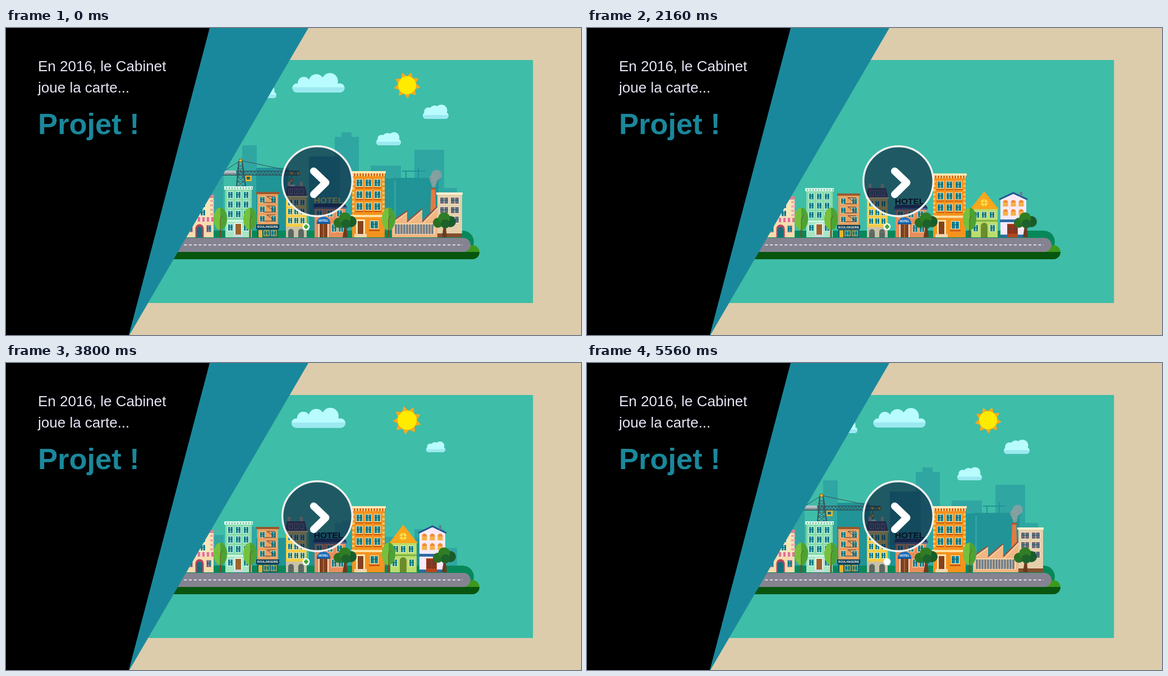
Write an HTML page with a canvas that moves like this. It is 1025 px wide and 547 px high and loops after 5600 ms.

```html
<!DOCTYPE html>
<html lang="fr">
<head>
<meta charset="utf-8">
<style>
  html, body { margin: 0; width: 100%; height: 100%; overflow: hidden; background: #dcccac; }
  canvas { display: block; }
</style>
</head>
<body>
<canvas id="stage" width="1025" height="547"></canvas>
<script>
const ctx = document.getElementById('stage').getContext('2d');
const SANS = '"Liberation Sans", Arial, sans-serif';
const STREET = 373, HALF = 2800, TAU = Math.PI * 2;

const mix = (a, b, p) => a + (b - a) * p;
const span = (u, from, to) => Math.min(1, Math.max(0, (u - from) / (to - from)));
const easeOut = p => 1 - (1 - p) ** 2;
const backOut = p => 1 + 2.4 * (p - 1) ** 3 + 1.4 * (p - 1) ** 2;

function rect(x, y, w, h, color) {
  ctx.fillStyle = color;
  ctx.fillRect(x, y, w, h);
}
function round(x, y, w, h, r, color) {
  ctx.fillStyle = color;
  ctx.beginPath();
  ctx.roundRect(x, y, w, h, r);
  ctx.fill();
}
function oval(x, y, rx, ry, color, from = 0, to = TAU) {
  ctx.fillStyle = color;
  ctx.beginPath();
  ctx.ellipse(x, y, rx, ry, 0, from, to);
  ctx.fill();
}
const dot = (x, y, r, color) => oval(x, y, r, r, color);
function trace(points) {
  ctx.beginPath();
  points.forEach(([x, y]) => ctx.lineTo(x, y));
}
function poly(color, ...points) {
  ctx.fillStyle = color;
  trace(points);
  ctx.fill();
}
function line(color, width, ...points) {
  ctx.strokeStyle = color;
  ctx.lineWidth = width;
  trace(points);
  ctx.stroke();
}
function text(str, x, y, font, color, align = 'left') {
  ctx.font = `${font} ${SANS}`;
  ctx.fillStyle = color;
  ctx.textAlign = align;
  ctx.fillText(str, x, y);
}
function clipped(x, y, w, h, draw) {
  ctx.save();
  ctx.beginPath();
  ctx.rect(x, y, w, h);
  ctx.clip();
  draw();
  ctx.restore();
}
function scaled(x, y, sx, sy, draw) {
  if (sx <= 0 || sy <= 0) return;
  ctx.save();
  ctx.translate(x, y);
  ctx.scale(sx, sy);
  ctx.translate(-x, -y);
  draw();
  ctx.restore();
}
const rise = (k, draw) => scaled(0, STREET, 1, k, draw);

function panes(xs, ys, w, h, frame, glass = '#14808e') {
  for (const y of ys) for (const x of xs) {
    rect(x - 1, y - 1, w + 2, h + 2, frame);
    rect(x, y, w, h, glass);
    rect(x + w / 2 - .5, y, 1, h, frame);
    rect(x, y + h * .4, w, 1, '#0c5f70');
  }
}
function arch(x, y, w, color) {
  oval(x, y, w / 2, w / 2, color, Math.PI, TAU);
  rect(x - w / 2, y, w, STREET - y, color);
}

// Sky
function cloud(x, base, w, h) {
  const puffs = color => {
    round(x - w / 2, base - h * .48, w, h * .48, h * .24, color);
    dot(x - w * .28, base - h * .5, h * .32, color);
    dot(x - w * .04, base - h * .56, h * .4, color);
    dot(x + w * .22, base - h * .6, h * .42, color);
  };
  puffs('#b8fcff');
  clipped(x - w, base - h * .27, w * 2, h * .27, () => puffs('#9be9f0'));
}
function sun(u) {
  const spikes = 9;
  const star = Array.from({ length: spikes * 2 }, (_, i) => {
    const a = i * Math.PI / spikes - TAU / 4 + (u - 1740) * .0003, r = i % 2 ? 16 : 24;
    return [715 + r * Math.cos(a), 102 + r * Math.sin(a)];
  });
  poly('#f6aa1c', ...star);
  dot(715, 102, 16, '#ffeb00');
}
function skyline() {
  const back = '#30a6a3', front = '#209497';
  const tower = (x, y, w, color) => rect(x, y, w, STREET - y, color);
  tower(350, 238, 38, back);
  tower(421, 209, 26, back);
  tower(586, 194, 43, back);
  rect(598, 186, 18, 8, back);
  tower(650, 245, 54, back);
  tower(728, 217, 53, back);
  tower(781, 285, 23, back);
  tower(446, 249, 58, front);
  tower(540, 229, 55, front);
  tower(676, 268, 16, front);
  tower(695, 271, 76, front);
  rect(691, 267, 84, 5, front);
  rect(706, 254, 42, 2, front);
  rect(712, 255, 2, 13, front);
  rect(734, 248, 2, 20, front);
}
function crane(u) {
  const steel = '#35505c';
  line(steel, 1, [387, 256], [418, 236], [523, 258]);
  line(steel, 2, [411, 283], [415, 238]);
  line(steel, 2, [427, 283], [421, 238]);
  for (let y = 242; y < 282; y += 8) line(steel, 1, [413, y], [424, y + 8], [412, y + 8], [423, y]);
  line(steel, 1.3, [385, 255], [523, 255]);
  line(steel, 1.3, [385, 262], [523, 262]);
  for (let x = 410; x < 520; x += 6) line(steel, 1, [x, 262], [x + 3, 255], [x + 6, 262]);
  rect(388, 254, 22, 7, '#b9c2c7');
  rect(388, 258, 22, 3, '#8c969d');
  rect(427, 263, 11, 10, '#e7b52b');
  rect(429, 265, 6, 5, '#28616c');
  const hook = 430 + 79 * easeOut(span(u, 1200, HALF));
  line(steel, 1, [hook, 259], [hook, 283]);
  rect(hook - 6, 279, 12, 4, '#e2e6e8');
  rect(hook - 7, 283, 14, 5, '#89939b');
  for (const [x, y] of [[418, 236], [521, 259], [hook, 259], [hook, 272]]) {
    dot(x, y, 3.3, '#594a25');
    dot(x, y, 2.5, '#efb51f');
  }
}

// Street fronts
function pinkHouse() {
  rect(335, 303, 35, 70, '#f8e5b9');
  rect(333, 297, 38, 6, '#d98390');
  for (let y = 306; y < 335; y += 8) rect(364, y, 7, 4, '#eeacaa');
  panes([347], [309, 324], 8, 10, '#fff3d4');
  rect(318, 344, 51, 29, '#f6dcae');
  rect(318, 337, 52, 8, '#e0718b');
  for (let x = 322; x < 368; x += 8) rect(x, 337, 4, 8, '#f8d5cf');
  arch(345, 357, 15, '#b4465b');
  arch(345, 359, 10, '#146f7c');
  panes([325, 358], [352], 7, 11, '#e38c97');
}
function greenHouse() {
  rect(391, 286, 47, 87, '#86dcaa');
  rect(389, 282, 51, 6, '#d6f8ea');
  for (let x = 392; x < 438; x += 5) rect(x, 284, 2, 3, '#78bfa0');
  rect(391, 342, 47, 3, '#d6f8ea');
  rect(391, 345, 47, 28, '#a8e6c3');
  panes([396, 410, 424], [292, 309, 326], 8, 11, '#d8f8ea');
  panes([396, 424], [350], 8, 11, '#e5fbf1');
  rect(407, 347, 14, 26, '#e9f5ec');
  rect(409, 349, 10, 24, '#a0622d');
  rect(405, 368, 18, 5, '#c9d8dc');
}
function bakery() {
  rect(448, 294, 37, 79, '#eaa061');
  rect(446, 292, 41, 4, '#96582f');
  panes([453, 473], [301, 318, 335], 8, 10, '#f8d09a');
  for (const y of [311, 328, 344]) line('#573b34', 1, [459, y], [481, y], [465, y - 11], [480, y - 11]);
  rect(446, 350, 41, 8, '#0c3c50');
  text('BOULANGERIE', 466.5, 356, 'bold 5px', '#fff', 'center');
  rect(448, 358, 37, 15, '#10596b');
  panes([460, 473], [361], 9, 9, '#e8b432', '#1b8790');
  rect(450, 360, 7, 13, '#e8b432');
}
function yellowHouse() {
  for (const x of [505, 527]) rect(x - 3, 274, 5, 18, '#cdb7a0');
  poly('#54435c', [497, 301], [501, 282], [533, 282], [537, 301]);
  panes([505, 515, 525], [287], 5, 8, '#a18aa5', '#263c4e');
  rect(499, 300, 37, 73, '#f6cb43');
  rect(497, 299, 41, 3, '#fbe6a0');
  panes([503, 514, 525], [306, 322, 338], 7, 10, '#fff0b8');
  rect(499, 354, 37, 19, '#c8c2a9');
  arch(508, 363, 10, '#5c6862');
  arch(526, 363, 10, '#5c6862');
}
function pharmacySign(u) {
  dot(535, 354, 6.3, '#fff');
  if (u > 2690 && u < 2780) return;
  rect(533.4, 350, 3.2, 8, '#38a62c');
  rect(531, 352.4, 8, 3.2, '#38a62c');
}
function hotel(u) {
  rect(550, 318, 55, 55, '#e88e5c');
  poly('#26355c', [547, 320], [550, 313], [604, 313], [608, 320]);
  rect(547, 319, 60, 3, '#4c6799');
  panes([554, 573, 590], [325], 9, 11, '#ffd5ac');
  const lit = u >= 1880 && (u - 1880) % 900 < 450;
  text('HOTEL', 575, 312, 'bold 15.5px', lit ? '#ffd43c' : '#000', 'center');
  rect(557, 348, 18, 25, '#f5e4d2');
  rect(559, 349, 14, 24, '#81401f');
  rect(565.5, 349, 1, 24, '#c98b55');
  oval(566, 347, 12, 11, '#1d70bb', Math.PI, TAU);
  rect(554, 346, 24, 3, '#1559a0');
  text('HOTEL', 566, 345, 'bold 5px', '#fff', 'center');
  panes([581, 593], [350], 8, 13, '#ffdfb8');
}
function orangeHouse() {
  rect(617, 258, 58, 115, '#f5931f');
  rect(615, 255, 62, 4, '#ffe9b5');
  rect(616, 259, 60, 5, '#d66c15');
  for (let x = 618; x < 675; x += 5) rect(x, 259, 2, 5, '#ffe0a0');
  for (let y = 268; y < 333; y += 8) {
    rect(617, y, 4, 4, '#ffc862');
    rect(671, y, 4, 4, '#ffc862');
  }
  panes([625, 641, 657], [270, 291, 312], 10, 12, '#ffe6b1');
  for (const y of [284, 305, 326]) for (const x of [623, 639, 655]) rect(x, y, 14, 2, '#c65b11');
  rect(615, 333, 62, 4, '#ffe1a0');
  rect(624, 341, 16, 32, '#ffe6b1');
  rect(627, 344, 10, 29, '#85421c');
  rect(621, 367, 22, 6, '#f4d6ae');
  panes([650], [344], 13, 13, '#fff0ca');
  rect(647, 359, 19, 3, '#c65b11');
}
function smallHouses() {
  rect(685, 318, 47, 55, '#b9dd6c');
  poly('#f8a61b', [683, 321], [708, 288], [734, 321]);
  dot(708, 309, 6.5, '#ffdf4a');
  line('#ed9317', 1, [701, 309], [715, 309]);
  line('#ed9317', 1, [708, 302], [708, 316]);
  panes([691, 704, 718], [326], 8, 11, '#eef5b7');
  rect(685, 341, 47, 3, '#7fb343');
  arch(708, 352, 12, '#6a8c2c');
  panes([689, 719], [350], 8, 12, '#eef5b7');

  poly('#f8eaf6', [737, 373], [737, 302], [760, 291], [783, 302], [783, 373]);
  line('#20548f', 3, [735, 303], [760, 291], [785, 303]);
  rect(772, 289, 4, 8, '#627b9a');
  for (const y of [309, 326]) for (const x of [746, 760, 774]) {
    oval(x, y, 4.5, 5, '#f08b35', Math.PI, TAU);
    rect(x - 4.5, y, 9, 7, '#f6b046');
  }
  rect(736, 340, 47, 5, '#2c6aa4');
  rect(737, 368, 46, 5, '#2c6aa4');
  rect(749, 348, 19, 25, '#b6461f');
  panes([751, 760], [351], 6, 14, '#7e2c18', '#8f3920');
}
function factory(chimney) {
  rise(chimney, () => {
    poly('#e37a43', [758, 285], [765, 285], [768, 373], [755, 373]);
    rect(757, 285, 9, 3, '#b95630');
  });
  rect(688, 345, 82, 28, '#f2b683');
  for (const [x, y] of [[715, 326], [742, 322], [769, 318]]) {
    poly('#f2b683', [x - 27, 346], [x, y], [x, 346]);
    line('#8a5a4c', 2.5, [x - 27, 345], [x, y]);
    line('#ffd8ac', 1.5, [x - 25, 347], [x, y + 3]);
  }
  rect(691, 348, 74, 20, '#fad3a4');
  for (let x = 693; x < 763; x += 5) rect(x, 350, 4, 17, '#76818b');
  rect(769, 296, 44, 77, '#e5cfaa');
  rect(767, 293, 47, 4, '#fff0d0');
  panes([774, 793], [302, 319, 336], 14, 11, '#f8e8c9', '#686a78');
  rect(769, 366, 44, 7, '#82502f');
}
function smoke(u) {
  const p = span(u, 2180, 2450);
  if (!p) return;
  ctx.globalAlpha = .85 * p;
  for (let i = 0; i < 4; i++) {
    const sway = Math.sin(u / 180 + i * 1.7);
    dot(762 + sway * 2.5 + (i % 2) * 3, 280 - i * 6 * p, 4 + i * 1.8, '#8ba0a0');
  }
  ctx.globalAlpha = 1;
}
function poplar(x) {
  rect(x - 1.5, 350, 3, 23, '#7a4a25');
  oval(x, 340, 12, 20, '#75c13d');
  oval(x, 340, 12, 20, '#4da235', -TAU / 4, TAU / 4);
  line('#70502a', 1, [x, 360], [x, 340], [x + 4, 334]);
}
function bushyTree(x) {
  poly('#6c3b20', [x - 4, 373], [x - 1, 354], [x + 3, 354], [x + 5, 373]);
  dot(x - 11, 347, 9, '#286f24');
  dot(x + 11, 345, 10, '#195c2c');
  dot(x, 339, 10.5, '#2f7d24');
  dot(x + 2, 349, 8, '#1d622b');
}

// Island and road
function mound() {
  round(278, 361, 556, 40, 20, '#08885a');
}
function road() {
  const island = color => round(268, 387, 576, 25, 12.5, color);
  island('#3c991c');
  clipped(260, 399, 600, 14, () => island('#07550e'));
  round(284, 374, 544, 25, 12.5, '#858391');
  ctx.setLineDash([5, 3.7]);
  line('#fff', 1.5, [300, 386.5], [814, 386.5]);
  ctx.setLineDash([]);
}
function ground(u, part) {
  const p = easeOut(span(u, 0, 200));
  clipped(254, 57, 686, 355, () => {
    ctx.globalAlpha = mix(.65, 1, p);
    ctx.translate(0, mix(39, 0, p));
    scaled(556, 400, mix(.41, 1, p), 1, part);
  });
}

function city(u) {
  const pop = from => backOut(span(u, from, from + 260));
  const clouds = [[557, 115, 93, 34], [766, 162, 46, 25], [682, 209, 44, 23], [459, 125, 46, 23]];
  clouds.forEach((c, i) => {
    const k = pop(880 + i * 60);
    scaled(c[0], c[1] - c[3] / 2, k, k, () => cloud(...c));
  });
  const sunSize = pop(850);
  scaled(715, 102, sunSize, sunSize, () => sun(u));
  rise(easeOut(span(u, 900, 1250)), skyline);
  rise(easeOut(span(u, 1000, 1300)), () => crane(u));
  ground(u, mound);

  const settle = mix(.965, 1, easeOut(span(u, 660, 900)));
  const height = from => pop(from) * settle;
  rise(height(330), pinkHouse);
  rise(height(290), greenHouse);
  rise(height(250), bakery);
  rise(height(210), yellowHouse);
  rise(height(190), () => hotel(u));
  rise(height(240), orangeHouse);
  rise(height(290) * (1 - span(u, 1620, 1800)), smallHouses);
  smoke(u);
  rise(easeOut(span(u, 1850, 2150)), () => factory(span(u, 2000, 2200)));

  rise(pop(310), () => pharmacySign(u));
  [382, 435, 682].forEach((x, i) => rise(pop(300 + i * 30), () => poplar(x)));
  [604, 781].forEach((x, i) => rise(pop(320 + i * 40), () => bushyTree(x)));
  ground(u, road);
}

function playButton() {
  dot(555, 273, 62, 'rgba(10, 25, 55, .6)');
  ctx.strokeStyle = '#f0f0f0';
  ctx.lineWidth = 3.4;
  ctx.beginPath();
  ctx.arc(555, 273, 62.3, 0, TAU);
  ctx.stroke();
  ctx.save();
  ctx.lineCap = ctx.lineJoin = 'round';
  line('#fff', 13, [548.5, 255], [570, 275.5], [548.5, 296.5]);
  ctx.restore();
}
function overlay() {
  poly('#1a889c', [362, 0], [539, 0], [220, 547], [218, 547]);
  poly('#000', [0, 0], [363, 0], [219, 547], [0, 547]);
  text('En 2016, le Cabinet', 57, 77, '26px', '#e6e4f5');
  text('joue la carte...', 57, 115, '26px', '#e6e4f5');
  text('Projet !', 57, 189, 'bold 52.5px', '#1a889c');
  playButton();
}

function frame(now) {
  // The city folds away during the first half and builds itself back in the second.
  const u = Math.abs(now % (HALF * 2) - HALF);
  const tint = easeOut(span(u, 0, 200));
  rect(0, 0, 1025, 547, '#dcccac');
  clipped(254, 57, 685.4, 433, () => {
    rect(254, 57, 686, 433, `rgb(${mix(32, 62, tint)}, ${mix(159, 189, tint)}, ${mix(176, 168, tint)})`);
    city(u);
  });
  overlay();
  requestAnimationFrame(() => frame(performance.now()));
}
frame(0);
</script>
</body>
</html>
```
